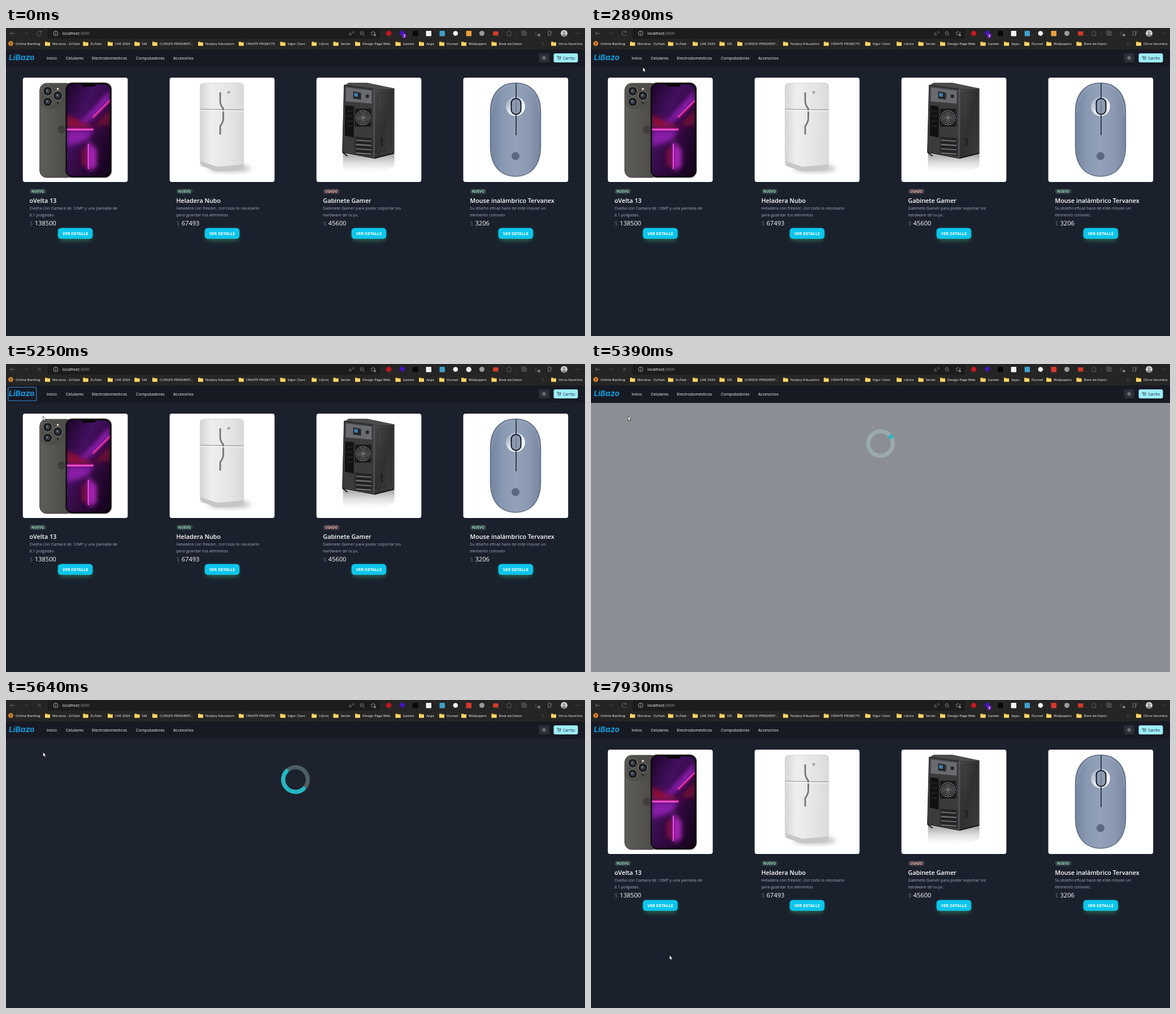
Write an HTML page that moves like this. It is 1025 px wide and 546 px high and loops after 8 s.

```html
<!DOCTYPE html>
<html lang="es">
<head>
<meta charset="utf-8">
<title>Tienda</title>
<style>
html, body { margin: 0; width: 100%; height: 100%; overflow: hidden; background: #1a202c; }
svg { display: block; width: 100vw; height: 100vh; font-family: "Open Sans", "Noto Sans", sans-serif; }
text { white-space: pre; }
</style>
</head>
<body>
<svg id="stage" viewBox="0 0 1025 546"></svg>
<script>
const rect = (x, y, w, h, r, fill, more = '') =>
  `<rect x="${x}" y="${y}" width="${w}" height="${h}" rx="${r}" fill="${fill}" ${more}/>`;
const circle = (x, y, r, fill, more = '') => `<circle cx="${x}" cy="${y}" r="${r}" fill="${fill}" ${more}/>`;
const path = (d, fill, more = '') => `<path d="${d}" fill="${fill}" ${more}/>`;
const line = (d, color, w = 0.8, more = '') => path(d, 'none', `stroke="${color}" stroke-width="${w}" ${more}`);
const text = (x, y, size, str, fill = '#fff', more = '') =>
  `<text x="${x}" y="${y}" font-size="${size}" fill="${fill}" ${more}>${str}</text>`;
const group = (id, body, more = '') => `<g id="${id}" ${more}>${body}</g>`;
const bold = 'font-weight="700"', semi = 'font-weight="600"';

const gradient = (id, dir, ...stops) => {
  const [x1, y1, x2, y2] = dir;
  return `<linearGradient id="${id}" x1="${x1}" y1="${y1}" x2="${x2}" y2="${y2}">` + stops.map(([c, a = 1], i) =>
    `<stop offset="${i / (stops.length - 1)}" stop-color="${c}" stop-opacity="${a}"/>`).join('') + '</linearGradient>';
};
const right = [0, 0, 1, 0], down = [0, 0, 0, 1], diag = [0, 0, 1, 1];

const defs = `<defs>
  ${gradient('steel', right, ['#5f5d59'], ['#55534f'], ['#474542'])}
  ${gradient('night', diag, ['#1c0529'], ['#43105f'], ['#2a0836'], ['#12031a'])}
  ${gradient('fridge', right, ['#d6d6d8'], ['#eeeeef'], ['#e9e9ea'], ['#e3e3e4'], ['#dadadb'])}
  ${gradient('panel', diag, ['#48484b'], ['#303032'], ['#3e3e41'])}
  ${gradient('mirror', down, ['#55555a', .6], ['#ffffff', 0])}
  ${gradient('mouse', right, ['#7584a0'], ['#8b9ab3'], ['#92a1b9'], ['#8b9ab2'], ['#78879f'])}
  ${gradient('halo', diag, ['#8b9bb4'], ['#e4eaf3'], ['#ffffff'])}
  <filter id="soft" x="-50%" y="-50%" width="200%" height="200%"><feGaussianBlur stdDeviation="4"/></filter>
  <clipPath id="screen"><rect x="78" y="12" width="76" height="162" rx="9"/></clipPath>
</defs>`;

// Product pictures, each in its own 186 px square
function phone() {
  const lens = (x, y) => circle(x, y, 8.2, '#1b1b1c', 'stroke="#8d8a84" stroke-width="1"')
    + circle(x, y, 4, '#36404a') + circle(x - 1, y - 1, 1.3, '#7f93a4');
  const glow = path('M78 66L118 84L132 90H78Z', '#8c0f35') + path('M126 86L154 56V84Z', '#6d0d38')
    + path('M100 82L154 22V40L122 74Z', '#8e1fae') + path('M78 94H126L112 112L78 122Z', '#8a1fa8')
    + path('M117 112L130 128V158L117 166Z', '#b025c0') + path('M115 118L104 130V154L115 162Z', '#7a0f3c');
  return rect(30, 10, 60, 167, 12, 'url(#steel)', 'stroke="#3d3b38" stroke-width="1"')
    + rect(33, 13, 40, 42, 10, '#4f4d4a') + lens(44, 24) + lens(62, 32) + lens(44, 43)
    + circle(62, 20, 2, '#d8d3c8') + circle(62, 45, 2, '#2b2a29')
    + circle(69, 92, 7, '#3e3c3a')
    + rect(75, 9, 82, 168, 12, '#0b090c', 'stroke="#55524e" stroke-width="1.2"')
    + `<g clip-path="url(#screen)">` + rect(78, 12, 76, 162, 0, 'url(#night)')
    + `<g filter="url(#soft)">${glow}</g>`
    + line('M124 70L154 40', '#ee38d0', 2.2) + line('M125 72L154 43', '#c0154a', 1.4)
    + line('M78 91H125', '#ff3fb0', 1.6) + line('M78 92.5H125', '#f056ee', 1.8)
    + line('M116 117V162', '#ea48ea', 2.2) + '</g>' + rect(104, 10, 25, 6, 3, '#0b090c');
}

function fridge() {
  return `<ellipse cx="106" cy="161" rx="38" ry="6" fill="#888" opacity=".6" filter="url(#soft)"/>`
    + path('M54 17Q54 10 60 10L124 9Q131 10 131 15V156Q128 164 120 164L84 166L56 156Q54 155 54 150Z', 'url(#fridge)', 'stroke="#c9c9cb" stroke-width=".7"')
    + path('M55 148L84 158L131 154V157Q128 164 120 164L84 166L56 156Z', '#c6c6c8')
    + line('M54 56L131 57', '#8c8c8e', 1.1) + line('M54 58L131 59', '#fff', 1)
    + line('M89.5 26V41Q89.500 49 95 55V58', '#747577', 2.8) + line('M95 60V72Q95 79 89.500 86V101', '#747577', 2.8)
    + circle(104.5, 26, 2.5, '#a2a4a7');
}

function tower() {
  let fan = '', slots = '';
  for (let i = 0; i < 4; i++) fan += circle(82.5, 71, 3 + i * 3.2, 'none', 'stroke="#98989b" stroke-width=".8"');
  for (let i = 0; i < 8; i++) {
    fan += line('M82.5 57V85', '#88888b', .5, `transform="rotate(${i * 22.5} 82.5 71)"`);
    slots += line(`M70 ${107 + i * 3.8}L97 ${109 + i * 3.8}`, i % 2 ? '#9a9a9d' : '#151516', 1.1);
  }
  return path('M47 135L102 143L138 134V158L102 174L47 166Z', 'url(#mirror)')
    + path('M49 14L57 9H90L138 19L102 21Z', '#4c4c4f')
    + path('M49 13L102 20V143L46 133Z', '#3b3b3e', 'stroke="#222" stroke-width="1"')
    + path('M102 20L138 19V134L102 143Z', 'url(#panel)')
    + path('M52 17L98 23V46L52 42Z', '#696b6f') + path('M65 24L79 27V39L65 37Z', '#26282c')
    + path('M67 27L73 28V34L67 33Z', '#3f86b5') + circle(90, 33, 3.2, '#25272a')
    + path('M51 49L66 51V106L50 103Z', '#111113') + line('M53 59H64M53 68H64M53 77H64M53 86H64', '#39393c', 1)
    + rect(68, 55, 29, 32, 2, '#1b1b1d') + fan + path('M68 104L99 107V139L68 135Z', '#2c2c2f') + slots
    + line('M102 20V143', '#66666a', 1.2) + line('M108 28L133 26V126L108 133Z', '#29292b', .8)
    + rect(114, 106, 3, 15, 1, '#1e1e20') + line('M47 133L55 139M102 143L137 134', '#111', 2);
}

function mouse() {
  return path('M48 60C48 28 66 9.5 92.5 9.5S137 28 137 60V122C137 156 119 175 92.5 175S48 156 48 122Z', 'url(#mouse)', 'stroke="#5d6a82" stroke-width="1.4"')
    + line('M51 64C51 30 68 13 92.5 13S134 30 134 64', '#a3b1c6', .8)
    + circle(92.5, 51, 17, 'url(#halo)') + line('M93.5 10V102', '#171d29', 1.5)
    + rect(85, 37, 17, 28, 8, '#8d9bb1', 'stroke="#10151f" stroke-width="2"') + line('M93.5 40V62', '#536076', 1)
    + circle(92.5, 139, 7, '#5b687f');
}

const products = [
  [phone, 'NUEVO', 'oVelta 13', 'Ovelta con Camara de 12MP y una pantalla de', '6.1 pulgadas.', 138500],
  [fridge, 'NUEVO', 'Heladera Nubo', 'Heladera con freezer, con todo lo necesario', 'para guardar tus alimentos.', 67493],
  [tower, 'USADO', 'Gabinete Gamer', 'Gabinete Gamer para poder soportar los', 'hardware de tu pc.', 45600],
  [mouse, 'NUEVO', 'Mouse inalámbrico Tervanex', 'Su diseño eficaz hace de este mouse un', 'elemento cómodo.', 3206]
];

function card([draw, state, name, line1, line2, price], i) {
  const isNew = state === 'NUEVO';
  return `<g transform="translate(${29.8 + i * 259.9} 88)">` + rect(0, 0, 185.7, 185, 4, '#fff') + draw()
    + rect(11.7, 197, 29.5, 9.2, 4.5, isNew ? '#2f3f43' : '#3f3a42')
    + text(26.4, 203.9, 6.3, state, isNew ? '#9ad9b4' : '#f0b2ae', bold + ' text-anchor="middle"')
    + text(11.7, 221.7, 10.8, name, '#fff', semi)
    + text(11.7, 234.3, 7.27, line1, '#a0aec0') + text(11.7, 245.8, 7.27, line2, '#a0aec0')
    + text(11.7, 262, 11.1, '$', '#4a5568') + text(21, 262, 11.1, price)
    + rect(64, 271, 58, 18, 6, '#48bb78', 'opacity=".45" filter="url(#soft)"')
    + rect(62, 266.5, 61.7, 19.3, 5.5, '#0bc5ea')
    + text(92.9, 278.8, 7.2, 'VER DETALLE', '#fff', bold + ' text-anchor="middle"') + '</g>';
}

const folder = x => path(`M${x} 24h3.4l1 1.2h4.6v6h-9z`, '#e0a22f') + rect(x, 26, 9, 5.4, .6, '#ffd869');
const bookmarks = [
  [69, 'Morania - ZuTask'], [136.5, 'ZuTask'], [180, 'UXE 2020'], [227.5, 'GN'], [259, 'CURSOS PENDIENT...'],
  [340, 'Nodary Education'], [412, 'CREATE PROJECTS'], [485.5, 'Vigor Claro'], [541, 'Libros'], [579.5, 'Series'],
  [618, 'Design Page Web'], [689.5, 'Games'], [731, 'Apps'], [767, 'Dunsel'], [806, 'Wallpapers'],
  [859.5, 'Base de Datos'], [965, 'Otros favoritos']
];

function browser() {
  const grey = '#8a8a8a', dim = '#555';
  return rect(0, 0, 1025, 38, 0, '#252525') + rect(74, 0, 588, 19, 3, '#1c1c1c')
    + line('M16 9.5H8M11.5 6L8 9.5L11.5 13', '#777') + line('M31 9.5H39M35.5 6L39 9.5L35.5 13', '#444')
    + group('reload', line('M62 7A4 4 0 1 0 63 10M62.5 4.5V7.5H59.5', '#777'))
    + group('stop', line('M56 6.5L62 12.5M62 6.5L56 12.5', '#777'))
    + circle(88, 9.5, 4, 'none', 'stroke="#ccc" stroke-width=".8"') + line('M88 9V12M88 7V8', '#ddd')
    + text(100, 12, 7.1, 'localhost<tspan fill="#999">:3000</tspan>')
    + text(607, 13, 8, 'A', grey) + line('M613 6q2 2 0 4M615 5q2 2.5 0 5', grey, .6)
    + circle(630, 9, 3, 'none', `stroke="${grey}" stroke-width=".8"`) + line('M632 11L634.5 13.5M628.5 9H631.5', grey)
    + line('M650 5L651.3 8H654.5L652 10L653 13L650 11.3L647 13L648 10L645.5 8H648.7Z', grey, .7) + circle(653, 12.5, 2, grey)
    + circle(677.5, 9.5, 4.6, '#c61722') + circle(701.5, 9, 4.2, '#4a12c4')
    + group('badge', rect(701, 10, 8, 8, 1.5, '#5b1fa8') + text(703.2, 16.6, 6.5, '7', '#fff', bold))
    + rect(720, 5, 9.5, 9.5, 1, '#080808') + rect(743.5, 5, 9.5, 9.5, 1, '#f1f1f1')
    + rect(767.5, 5, 9.5, 9.5, 1, '#3f9fca') + circle(795.8, 9.5, 4.3, '#f4f4f4')
    + rect(814.5, 5, 9.5, 9.5, 1, '#e9a23b', 'id="ext"')
    + circle(842.5, 9.5, 4.5, '#999') + rect(862, 6, 9.5, 7.5, .5, '#cf3a2b')
    + line('M887 7h2q0-2 1.5-2t1.5 2h2v2q-2 0-2 1.5t2 1.5v1.5h-7z', '#666') + line('M903.5 4V15', '#3c3c3c')
    + line('M913 5h6v6h-6zM915 11v2h6V7h-2M914.5 8h3M916 6.5v3', grey, .7)
    + line('M938 5V10M936 8L938 10L940 8M936 13H940', dim, .9) + circle(943.5, 12.5, 2.3, grey)
    + line('M959.5 6h5v7h-5zM962 11l5-5', grey, .8) + circle(988, 9.5, 6, '#d2d0ce') + circle(988, 7.7, 2, '#8a8683')
    + path('M984 13.5q0-3 4-3t4 3q-4 3.5-8 0z', '#8a8683')
    + [1010, 1013, 1016].map(x => circle(x, 9.5, .6, grey)).join('')
    + circle(8.5, 27.5, 4.4, '#d9822b') + line('M8.5 25V30', '#3a2410', 1) + text(17, 29.8, 6.15, 'Online Banking')
    + bookmarks.map(([x, s]) => folder(x) + text(x + 13, 29.8, 6.15, s)).join('')
    + line('M949 25L952 27.5L949 30', '#666');
}

function navbar() {
  const links = [[72, 'Inicio'], [106, 'Celulares'], [152, 'Electrodomesticos'], [230, 'Computadoras'], [296, 'Accesorios']];
  let rays = '';
  for (let i = 0; i < 8; i++) rays += line('M952.5 49.3V50.3', '#ddd', .8, `transform="rotate(${i * 45} 952.5 53)"`);
  return rect(0, 38, 1025, 31, 0, '#171923')
    + rect(68, 45, 27, 16, 3, '#2d3748', 'id="hoverHome"') + rect(102, 45, 39, 16, 3, '#2d3748', 'id="hoverPhones"')
    + text(5, 57.3, 13.8, 'LiBazo', '#0f9be0', `font-family="Inter, 'Open Sans', sans-serif" font-style="italic" ` + bold)
    + rect(3.7, 41.2, 50, 24, 1, 'none', 'id="focus" stroke="#306a9c" stroke-width="1.6"')
    + links.map(([x, s]) => text(x, 55.7, 7.3, s)).join('')
    + rect(943.5, 45, 18.5, 16, 3, '#2c2f38') + circle(952.5, 53, 1.7, 'none', 'stroke="#ddd" stroke-width=".8"') + rays
    + rect(969.5, 45, 43, 16, 3, '#9decf9')
    + line('M975.5 50.3H976.8L978 54H981.5L982 51H977.3', '#1a202c', .8) + circle(978.3, 55.7, .6, '#1a202c') + circle(981.2, 55.7, .6, '#1a202c')
    + text(986, 55.5, 6.6, 'Carrito', '#1a202c');
}

const ring = 'stroke-width="7.3" pathLength="264"';
const $ = id => document.getElementById(id);
$('stage').innerHTML = defs + rect(0, 0, 1025, 546, 0, '#1a202c')
  + rect(0, 69, 1025, 477, 0, '#fff', 'id="veil"') + browser() + navbar()
  + group('shop', products.map(card).join(''))
  + group('loader', circle(512.5, 141, 21.8, 'none', 'stroke="#beebe5" stroke-opacity=".3" ' + ring)
    + circle(512.5, 141, 21.8, 'none', 'id="arc" stroke="#22b8c4" stroke-linecap="round" ' + ring))
  + group('status', rect(0, 535, 43, 11, 1, '#252525') + text(0, 543, 6.1, 'localhost:3000', '#aaa'))
  + group('cursor', path('M0 0V8L1.9 6.3L3.2 9.2L4.5 8.6L3.2 5.8H5.7Z', '#fff', 'id="arrow" stroke="#000" stroke-width=".6"')
    + path('M-1 1a1 1 0 0 1 2 0v4l4 1q1.4.5 1.1 2l-.8 3.8h-5.6L-3.6 7.3q0-1.5 1.3-.8l1.3 1z', '#fff', 'id="hand" stroke="#000" stroke-width=".5"'));

// Pointer stops: time, x, y
const stops = [
  [510, 1003, 538], [800, 760, 390], [1070, 549, 279], [1210, 579, 318], [1410, 579, 318], [1700, 310, 380],
  [1830, 232, 388], [1900, 212.5, 384], [2180, 204, 345], [2250, 204, 345], [2600, 150, 190], [2900, 90, 66],
  [3020, 82, 56], [3090, 82, 56], [3220, 112, 58], [3550, 112, 58], [3800, 52, 60], [3890, 41.5, 60.5],
  [4700, 41.5, 60.5], [5200, 65.5, 92.5], [7600, 65.5, 92.5], [7930, 139, 452.5], [8000, 139, 452.5]
];

function pointer(t) {
  const i = Math.max(1, stops.findIndex(s => s[0] > t));
  const [t0, x0, y0] = stops[i - 1], [t1, x1, y1] = stops[i], k = (t - t0) / (t1 - t0);
  return [x0 + (x1 - x0) * k, y0 + (y1 - y0) * k];
}

const show = (id, on) => $(id).style.display = on ? '' : 'none';

function spin(t) {
  const e = Math.max(0, t - 5403), s = e / 1500 % 1, growing = s < .5;
  const length = growing ? 1 + 798 * s : 400;
  const offset = growing ? 200 * s : 100 + 320 * (s - .5);
  $('arc').setAttribute('stroke-dasharray', `${length} 400`);
  $('arc').setAttribute('stroke-dashoffset', -offset);
  $('arc').setAttribute('transform', `rotate(${-34.4 + .1685 * e} 512.5 141)`);
}

function frame(now) {
  const t = now % 8000, within = (a, b) => t >= a && t < b;
  const loading = within(5390, 7030), stopping = within(4440, 6130), hand = within(2940, 4790);
  show('shop', !loading);
  show('loader', loading);
  show('stop', stopping);
  show('reload', !stopping);
  show('badge', !within(5040, 6500));
  show('hoverHome', within(2930, 3550) || within(3720, 3960));
  show('hoverPhones', within(3550, 3720));
  show('focus', within(4440, 5390));
  show('status', within(3090, 4440));
  show('cursor', t >= 510);
  show('hand', hand);
  show('arrow', !hand);
  $('veil').setAttribute('opacity', within(5390, 5800) ? .5 * Math.exp((5390 - t) / 65) : 0);
  $('ext').setAttribute('fill', within(5110, 5390) ? '#e8e8e8' : t < 5110 ? '#e9a23b' : '#d8382f');
  $('ext').setAttribute('rx', within(5110, 5390) ? 4.75 : 1);
  $('cursor').setAttribute('transform', `translate(${pointer(t)})`);
  if (loading) spin(t);
  requestAnimationFrame(frame);
}
requestAnimationFrame(frame);
</script>
</body>
</html>
```
